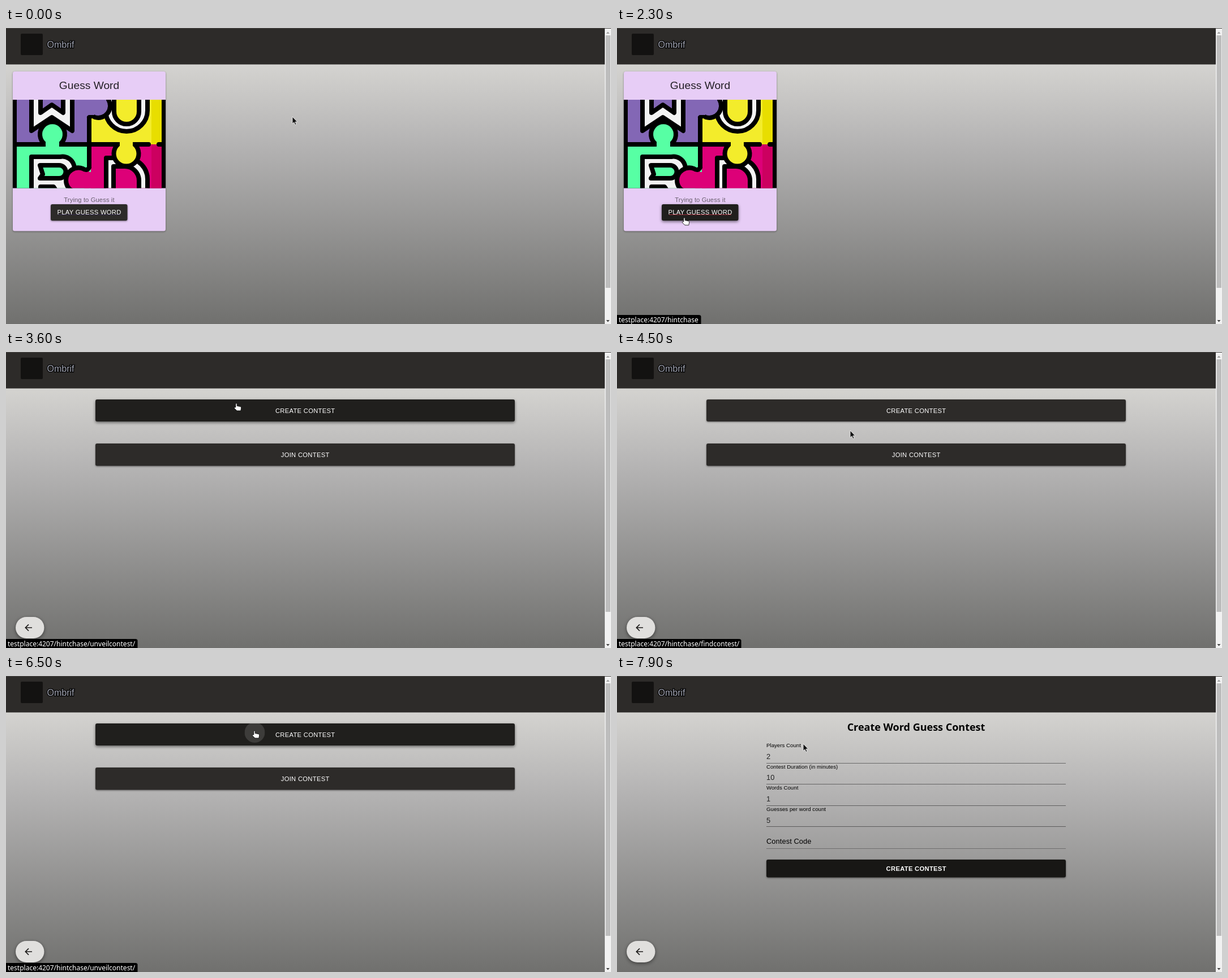
These frames come from a looping animation (1069x524 px, 8000 ms). An HTML page:

```html
<!DOCTYPE html>
<html lang="en">
<head>
<meta charset="utf-8">
<title>Word contest</title>
<style>
  html, body { margin: 0; width: 100%; height: 100%; overflow: hidden; background: #2d2b29; }
  svg { display: block; width: 1069px; height: 524px; font-family: "Liberation Sans", Arial, sans-serif; }
  .button rect { fill: #2d2b29; filter: drop-shadow(0 1px 1.5px #0007); }
  .button.hover rect { fill: #201f1d; filter: drop-shadow(0 2px 2.5px #0008); }
  .button text { fill: #fff; font-size: 11.2px; letter-spacing: .32px; text-anchor: middle; }
  .ink { stroke: #000; stroke-width: 8; stroke-linejoin: round; stroke-linecap: round; }
  .label { font-size: 9.6px; letter-spacing: .05px; }
  .value { font-size: 12.8px; letter-spacing: .1px; }
  .rule { stroke: #000; stroke-opacity: .45; }
  .rule.hover { stroke-opacity: .75; stroke-width: 1.6; }
</style>
</head>
<body>
<svg viewBox="0 0 1069 524">
  <defs>
    <linearGradient id="sky" x2="0" y2="1">
      <stop stop-color="#d4d3d0"/><stop offset=".3" stop-color="#b5b4b4"/><stop offset="1" stop-color="#70706e"/>
    </linearGradient>
    <clipPath id="cover"><path d="M12 127h270v156.500h-270z"/></clipPath>
  </defs>

  <rect width="1058" height="64.500" fill="#2d2b29"/>
  <rect width="1069" height="1" fill="#484745"/>
  <rect y="64.500" width="1058" height="460" fill="url(#sky)"/>
  <rect x="26" y="10" width="39" height="38" rx="2" fill="#131211"/>
  <text x="72.500" y="34.500" font-size="16" fill="#a3a6b4" stroke="#000" stroke-width="2.500" paint-order="stroke">Ombrif</text>
  <rect x="1058" y="1" width="11" height="523" fill="#f1f1f1"/>
  <rect x="1059.500" y="13" width="8.500" height="447" fill="#bdbdbd"/>
  <path d="M1060.500 10l3-3.500 3 3.500z" fill="#a0a0a0"/>
  <path d="M1060.500 517l3 3.500 3-3.500z" fill="#444"/>

  <g class="page">
    <rect x="12" y="77" width="270" height="282.500" rx="3.500" fill="#e7cdf6" style="filter:drop-shadow(0 1px 1.5px #0006)"/>
    <text x="147" y="108" font-size="19.200" text-anchor="middle" fill="#231f25">Guess Word</text>
    <g clip-path="url(#cover)">
      <path d="M12 127h270v157h-270z"/>
      <path d="M19 127h131v79h-131z" fill="#8367b5"/>
      <path d="M150 127h125v79h-125z" fill="#f3ec2b"/>
      <path d="M257 127h18v79h-18z" fill="#e8de00"/>
      <path d="M19 206h131v78h-131z" fill="#57ffa4"/>
      <path d="M150 206h125v78h-125z" fill="#dd0078"/>
      <path d="M257 206h18v78h-18z" fill="#cc0060"/>
      <path class="ink" d="M12 206H252M270 206h10M147 160v85" fill="none"/>
      <!-- letters -->
      <path class="ink" d="M45 120V182L81 158L117 182V120" fill="#f3f3f3"/>
      <path class="ink" d="M61 120V150L81 136L101 150V120" fill="#8367b5"/>
      <path class="ink" d="M176 120V146a37 37 0 0 0 74 0V120" fill="#f3f3f3"/>
      <path class="ink" d="M191 120V148a22 22 0 0 0 44 0V120" fill="#f3ec2b"/>
      <path class="ink" d="M45 290V228H96a21 21 0 0 1 12 40l8 22" fill="#f3f3f3"/>
      <path class="ink" d="M60 243H94a10 10 0 0 1 0 23H60l5-7z" fill="#57ffa4"/>
      <path class="ink" d="M61 290V281H84l6 9" fill="#57ffa4"/>
      <path class="ink" d="M177 290V230H212a38 38 0 0 1 38 40V290" fill="#f3f3f3"/>
      <path class="ink" d="M190 290V245H210a25 25 0 0 1 25 25V290" fill="#dd0078"/>
      <!-- puzzle tabs -->
      <path class="ink" d="M147 158q5-4 10 0a21 21 0 0 0 24-31V120H147" fill="#8367b5"/>
      <path d="M140 127h16v27h-16z" fill="#8367b5"/>
      <path class="ink" d="M64 206h5a22 22 0 1 1 26 0h5" fill="#57ffa4"/>
      <path d="M70 201h24v12h-24z" fill="#57ffa4"/>
      <path class="ink" d="M193 206h5a22 22 0 1 0 29 0h5" fill="#f3ec2b"/>
      <path d="M201 199h23v12h-23z" fill="#f3ec2b"/>
      <path class="ink" d="M147 247q-4 7-11 2a22 22 0 1 0 0 41h11" fill="#dd0078"/>
      <path d="M138 255h20v30h-20z" fill="#dd0078"/>
    </g>
    <text x="147" y="307.500" font-size="11.200" letter-spacing=".12" text-anchor="middle" fill="#675d6c">Trying to Guess it</text>
    <g class="button" data-box="79 312 135.500 29">
      <path id="link" d="M92 330.500h110" stroke-width="1"/>
      <text x="147" y="330">PLAY GUESS WORD</text>
    </g>
  </g>

  <g class="page">
    <g class="button" data-box="158 84 741 39"><text x="528.700" y="107.500">CREATE CONTEST</text></g>
    <g class="button" data-box="158 162 741 39.500"><text x="528.700" y="186">JOIN CONTEST</text></g>
    <circle id="ripple" cx="439.500" cy="100" r="18" fill="#fff" opacity=".13" style="clip-path:inset(2px 0 0)"/>
  </g>

  <g class="page" id="form">
    <text x="528.500" y="97" text-anchor="middle" font-size="18" font-weight="700" font-family="Noto Sans, Open Sans, sans-serif">Create Word Guess Contest</text>
    <text class="value" x="264" y="297">Contest Code</text>
    <path class="rule" d="M264 305.500h529" style="stroke-opacity:.3"/>
    <rect x="264" y="325" width="529" height="31.500" rx="3" fill="#181715" style="filter:drop-shadow(0 1px 1.5px #0007)"/>
    <text x="528.700" y="345" text-anchor="middle" font-size="11.200" font-weight="700" letter-spacing=".32" fill="#fff">CREATE CONTEST</text>
  </g>

  <g id="back">
    <rect x="17" y="469" width="50.500" height="38" rx="19" fill="#e0dfdd" style="filter:drop-shadow(0 2px 3px #0007)"/>
    <path d="M46 488H34.500M40 482.300L34.300 488L40 493.700" fill="none" stroke="#1c1b1a" stroke-width="1.700"/>
  </g>

  <g id="status">
    <path id="bubble"/>
    <text x="3" y="520.500" font-size="12" fill="#fff" font-family="Noto Sans, Open Sans, sans-serif"></text>
  </g>

  <g id="cursor">
    <path d="M0 0V12.500L2.900 9.900L5 14.500L7 13.600L5 9.200H8.800Z" fill="#111" stroke="#fff" stroke-width=".8"/>
    <path d="M-1.200 7V1a1.200 1.200 0 0 1 2.400 0V4.500l5.800 1.100q1.700.4 1.700 2.300L7.800 13H1L-3.600 8.600q-.5-1.700 1.100-1.700z" fill="#fff" stroke="#000" stroke-width=".8"/>
    <g fill="none">
      <path d="M-2-5.500H2M0-5.500V5.500M-2 5.500H2" stroke="#fff" stroke-width="2.200" opacity=".6"/>
      <path d="M-2-5.500H2M0-5.500V5.500M-2 5.500H2" stroke="#111" stroke-width="1"/>
    </g>
  </g>
</svg>

<script>
const $ = selector => document.querySelector(selector);
const all = selector => [...document.querySelectorAll(selector)];
const show = (node, on) => node.style.display = on ? '' : 'none';
const NS = 'http://www.w3.org/2000/svg';
const FIELD = { left: 264, width: 529, step: 37.6 };

function add(parent, tag, attributes, text = '') {
  const node = document.createElementNS(NS, tag);
  for (const name in attributes) node.setAttribute(name, attributes[name]);
  node.textContent = text;
  parent.prepend(node);
  return node;
}

const buttons = all('.button').map(node => {
  const [x, y, width, height] = node.dataset.box.split(' ').map(Number);
  add(node, 'rect', { x, y, width, height, rx: 3 });
  return { node, x, y, width, height, page: all('.page').indexOf(node.parentNode) };
});

const rules = [['Players Count', 2], ['Contest Duration (in minutes)', 10], ['Words Count', 1], ['Guesses per word count', 5]]
  .map(([label, value], i) => {
    const y = i * FIELD.step, x = FIELD.left;
    add($('#form'), 'text', { class: 'label', x, y: 126 + y }, label);
    add($('#form'), 'text', { class: 'value', x, y: 146.8 + y, fill: '#222' }, value);
    return add($('#form'), 'path', { class: 'rule', d: `M${x} ${Math.floor(154 + y) + .5}h${FIELD.width}` });
  });

// time, x, y of the pointer's hot spot
const route = [
  [500, 506, 157], [700, 330, 345], [800, 250, 377], [900, 232, 366], [1000, 232, 366],
  [1200, 150, 332], [1500, 490, 203], [1600, 490, 203], [2000, 140, 328], [2300, 119, 336],
  [2500, 119, 336], [3000, 385, 165], [3200, 402, 99], [3300, 402, 99], [3600, 407, 91],
  [3700, 409, 88], [3900, 410, 118], [4100, 411, 172], [4300, 412, 182], [4700, 411, 95],
  [5100, 411, 172], [5400, 410, 180], [5600, 411, 170], [5800, 420, 105], [5900, 426, 116],
  [6000, 431, 141], [6100, 435, 112], [6300, 439, 97], [6800, 439, 97], [7100, 294, 187],
  [7300, 293, 184], [7700, 321, 140], [7900, 329, 120]
];

const host = 'testplace:4207/hintchase';
const join = [host + '/findcontest/', 219], create = [host + '/unveilcontest/', 232];
const hints = [[0], [2000, host, 148], [2600], [3000, ...join], [3200, ...create], [4100, ...join],
  [4600, ...create], [5100, ...join], [5800, ...create], [6900]];

function pointerAt(t) {
  const i = route.findIndex(key => key[0] >= t);
  if (i < 0) return route.at(-1).slice(1);
  if (i === 0) return route[0].slice(1);
  const [t0, x0, y0] = route[i - 1], [t1, x1, y1] = route[i];
  const k = (t - t0) / (t1 - t0);
  return [x0 + (x1 - x0) * k, y0 + (y1 - y0) * k].map(Math.round);
}

function draw(time) {
  const t = Math.floor(time % 8000 / 100) * 100;
  const page = t < 2400 ? 0 : t < 6700 ? 1 : 2;
  const [x, y] = pointerAt(t);

  all('.page').forEach((node, i) => show(node, i === page));
  show($('#back'), page > 0);
  show($('#ripple'), t >= 6500);

  let shape = 0;
  for (const b of buttons) {
    const over = b.page === page && x >= b.x && x <= b.x + b.width && y >= b.y && y <= b.y + b.height;
    b.node.classList.toggle('hover', over);
    if (over) shape = 1;
  }
  $('#link').setAttribute('stroke', shape ? '#a3303c' : '#352c4c');

  rules.forEach((rule, i) => {
    const top = 132 + i * FIELD.step;
    const over = page === 2 && x >= FIELD.left && y >= top && y <= top + 23;
    rule.classList.toggle('hover', over);
    if (over) shape = 2;
  });
  if (page === 2 && y < 106) shape = 2;

  const [, hint, width] = hints.findLast(entry => entry[0] <= t);
  show($('#status'), hint);
  if (hint) {
    $('#bubble').setAttribute('d', `M0 508H${width - 3}q3.500 0 3.500 3.500V524H0z`);
    $('#status text').textContent = hint;
  }

  $('#cursor').setAttribute('transform', `translate(${x} ${y})`);
  [...$('#cursor').children].forEach((node, i) => show(node, i === shape));
}

const start = performance.now();
function tick() {
  draw(performance.now() - start);
  requestAnimationFrame(tick);
}
tick();
</script>
</body>
</html>
```
